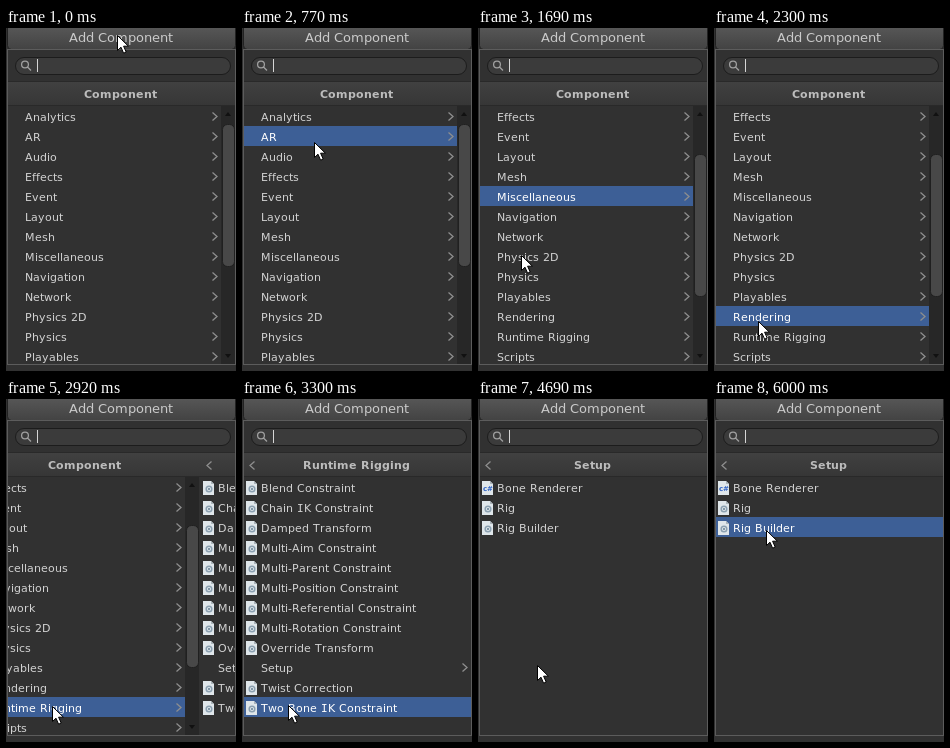
An HTML page with a canvas for the animation above (7.01 s loop, 230 by 343 pixels).

```html
<!DOCTYPE html>
<html lang="en">
<head>
<meta charset="utf-8">
<title>Add Component menu</title>
<style>
html, body { margin: 0; width: 100%; height: 100%; overflow: hidden; background: #313131; }
canvas { display: block; }
</style>
</head>
<body>
<canvas id="stage" width="230" height="343"></canvas>
<script>
const ctx = document.getElementById('stage').getContext('2d');
const LOOP = 7010, ROW = 20, TOP = 78;
const SCROLL_TICK = 22, OPEN_TICKS = [37, 57];
const SANS = '"DejaVu Sans", sans-serif', MONO = '"DejaVu Sans Mono", monospace';

const pages = [
  { title: 'Component', scrollable: true, submenu: () => true,
    items: ['Analytics', 'AR', 'Audio', 'Effects', 'Event', 'Layout', 'Mesh', 'Miscellaneous',
      'Navigation', 'Network', 'Physics 2D', 'Physics', 'Playables', 'Rendering',
      'Runtime Rigging', 'Scripts'] },
  { title: 'Runtime Rigging', submenu: name => name === 'Setup',
    items: ['Blend Constraint', 'Chain IK Constraint', 'Damped Transform', 'Multi-Aim Constraint',
      'Multi-Parent Constraint', 'Multi-Position Constraint', 'Multi-Referential Constraint',
      'Multi-Rotation Constraint', 'Override Transform', 'Setup', 'Twist Correction',
      'Two Bone IK Constraint'] },
  { title: 'Setup', submenu: () => false, items: ['Bone Renderer', 'Rig', 'Rig Builder'] }
];

// Pointer path: tick (13 per second), x, y
const path = [
  [5, 111, 7], [10, 72, 114], [15, 47, 205], [19, 43, 227], [26, 43, 227], [30, 44, 293],
  [32, 44, 307], [33, 44, 307], [34, 46, 307], [42, 46, 307], [43, 46, 306], [47, 52, 285],
  [52, 59, 268], [53, 59, 267], [54, 59, 267], [55, 59, 266], [64, 59, 266], [68, 62, 225],
  [74, 54, 145], [78, 52, 131]
];

function pointerAt(tick) {
  const next = path.findIndex(p => p[0] >= tick);
  if (next < 0) return path[path.length - 1].slice(1);
  if (next === 0) return path[0].slice(1);
  const a = path[next - 1], b = path[next];
  const k = (tick - a[0]) / (b[0] - a[0]);
  return [1, 2].map(i => Math.round(a[i] + (b[i] - a[i]) * k));
}

const smooth = v => { v = Math.min(1, Math.max(0, v)); return v * v * (3 - 2 * v); };

function hoveredRow(index, tick) {
  // A page keeps its hovered row once clicked; a new page has none until the pointer moves
  if (index === 1 && tick < 43) return -1;
  let at = Math.min(tick, OPEN_TICKS[index] ?? tick);
  if (at === SCROLL_TICK) at--;
  const scroll = index === 0 && at > SCROLL_TICK ? 60 : 0;
  return Math.floor((pointerAt(at)[1] + scroll - TOP) / ROW);
}

function rect(x, y, w, h, fill) {
  ctx.fillStyle = fill;
  ctx.fillRect(x, y, w, h);
}

function line(color, width) {
  ctx.strokeStyle = color;
  ctx.lineWidth = width;
  ctx.stroke();
}

function rounded(x, y, w, h, radius, fill, stroke) {
  ctx.beginPath();
  ctx.roundRect(x, y, w, h, radius);
  ctx.fillStyle = fill;
  ctx.fill();
  line(stroke, 1);
}

function shape(points, fill) {
  ctx.beginPath();
  points.forEach(([x, y]) => ctx.lineTo(x, y));
  if (fill) { ctx.closePath(); ctx.fillStyle = fill; ctx.fill(); }
}

function gradient(y1, y2, from, to) {
  const g = ctx.createLinearGradient(0, y1, 0, y2);
  g.addColorStop(0, from);
  g.addColorStop(1, to);
  return g;
}

// Letters advance by whole pixels, as in hinted interface text
const advance = char => Math.round(ctx.measureText(char).width + 0.05);

function text(str, x, y, font, color) {
  ctx.font = font;
  ctx.fillStyle = color;
  for (const char of str) {
    ctx.fillText(char, x, y);
    x += advance(char);
  }
  return x;
}

function centered(str, y, font, color) {
  ctx.font = font;
  const width = [...str].reduce((sum, char) => sum + advance(char), 0);
  text(str, Math.floor(115 - width / 2), y, font, color);
}

// Capital I in "IK" has serifs
function label(str, y, color) {
  const [before, after] = str.split('IK');
  const x = text(before, 19, y, '11px ' + SANS, color);
  if (after === undefined) return;
  text('K' + after, text('I', x, y, '11px ' + MONO, color), y, '11px ' + SANS, color);
}

function chevron(x, y, dir) {
  shape([[x, y - 4], [x + 4.5 * dir, y], [x, y + 4]]);
  line('#8e8e8e', 1.3);
}

function icon(y, script) {
  shape([[4, y], [12, y], [15, y + 3], [15, y + 14], [4, y + 14]], '#dfe6ea');
  shape([[12, y], [12, y + 3], [15, y + 3]], '#aab4ba');
  if (script) {
    text('c#', 5, y + 10, 'bold 7px ' + SANS, '#2e62c4');
  } else {
    ctx.beginPath();
    ctx.arc(10, y + 8, 2.8, 0, 7);
    line('#8ba0b0', 1.5);
    rect(9, y + 7, 2, 2, '#8097a8');
  }
}

function scrollbar(scroll) {
  rect(215, 78, 14, 258, '#272727');
  shape([[219, 88], [225, 88], [222, 84]], '#111');
  shape([[219, 326], [225, 326], [222, 330]], '#111');
  rounded(216.5, 96.5 + scroll / 2, 12, 142, 5, '#484848', '#202020');
}

function drawPage(index, tick, dx) {
  const page = pages[index], width = page.scrollable ? 215 : 229;
  const scroll = page.scrollable && tick >= SCROLL_TICK ? 60 : 0;
  const hovered = hoveredRow(index, tick);
  ctx.save();
  ctx.translate(dx, 0);
  rect(1, 53, 229, 283, '#313131');
  rect(1, 53, 229, 25, gradient(53, 78, '#414141', '#363636'));
  rect(1, 53, 229, 1, '#292929');
  rect(1, 77, 229, 1, '#292929');
  centered(page.title, 70, 'bold 11px ' + SANS, '#bcbcbc');
  if (index) chevron(12.5, 66.5, -1);
  ctx.beginPath();
  ctx.rect(1, 78, 229, 258);
  ctx.clip();
  page.items.forEach((name, i) => {
    const y = TOP + i * ROW - scroll;
    if (y < TOP) return;
    if (i === hovered) rect(2, y, width - 2, ROW, '#3d5f96');
    label(name, y + 15, i === hovered ? '#fff' : '#d2d2d2');
    if (page.submenu(name)) chevron(width - 8.5, y + 10.5, 1);
    else icon(y + 4, name === 'Bone Renderer');
  });
  if (page.scrollable) scrollbar(scroll);
  ctx.restore();
}

function drawFrame() {
  rect(0, 0, 230, 343, '#313131');
  rounded(1.5, -6, 228, 27.5, 4, gradient(0, 21, '#565656', '#434343'), '#222');
  centered('Add Component', 14, '13px ' + SANS, '#cacaca');
  rect(1, 21, 229, 1, '#5c5c5c');
  rounded(9.5, 29.5, 215, 17, 8.5, '#3b3b3b', '#1c1c1c');
  ctx.beginPath();
  ctx.arc(19, 36.5, 3.4, 0, 7);
  ctx.moveTo(21.5, 39);
  ctx.lineTo(25, 42.5);
  line('#a0a0a0', 1.3);
  rect(31, 31, 1, 13, '#d6d6d6');
}

function drawPointer(x, y) {
  ctx.save();
  ctx.translate(x, y);
  shape([[0.5, 0.5], [0.5, 15.5], [4, 12.2], [6.6, 18.2], [9.2, 17], [6.6, 11.2], [11.4, 11.2]], '#fff');
  line('#000', 1);
  ctx.restore();
}

function draw(time) {
  const tick = Math.floor(time * 0.013 + 0.15);
  const position = OPEN_TICKS.reduce((sum, open) => sum + smooth((tick - open) / 4), 0);
  const first = Math.floor(position), shift = Math.round((position - first) * 229);

  drawFrame();
  ctx.save();
  ctx.beginPath();
  ctx.rect(1, 53, 229, 283);
  ctx.clip();
  drawPage(first, tick, -shift);
  if (shift) drawPage(first + 1, tick, 229 - shift);
  ctx.restore();
  rect(1, 21, 1, 316, '#5c5c5c');
  rect(229, 21, 1, 316, '#5c5c5c');
  rect(1, 336, 229, 1, '#5c5c5c');
  drawPointer(...pointerAt(tick));
}

const start = performance.now();
function loop() {
  draw((performance.now() - start) % LOOP);
  requestAnimationFrame(loop);
}
loop();
</script>
</body>
</html>
```
